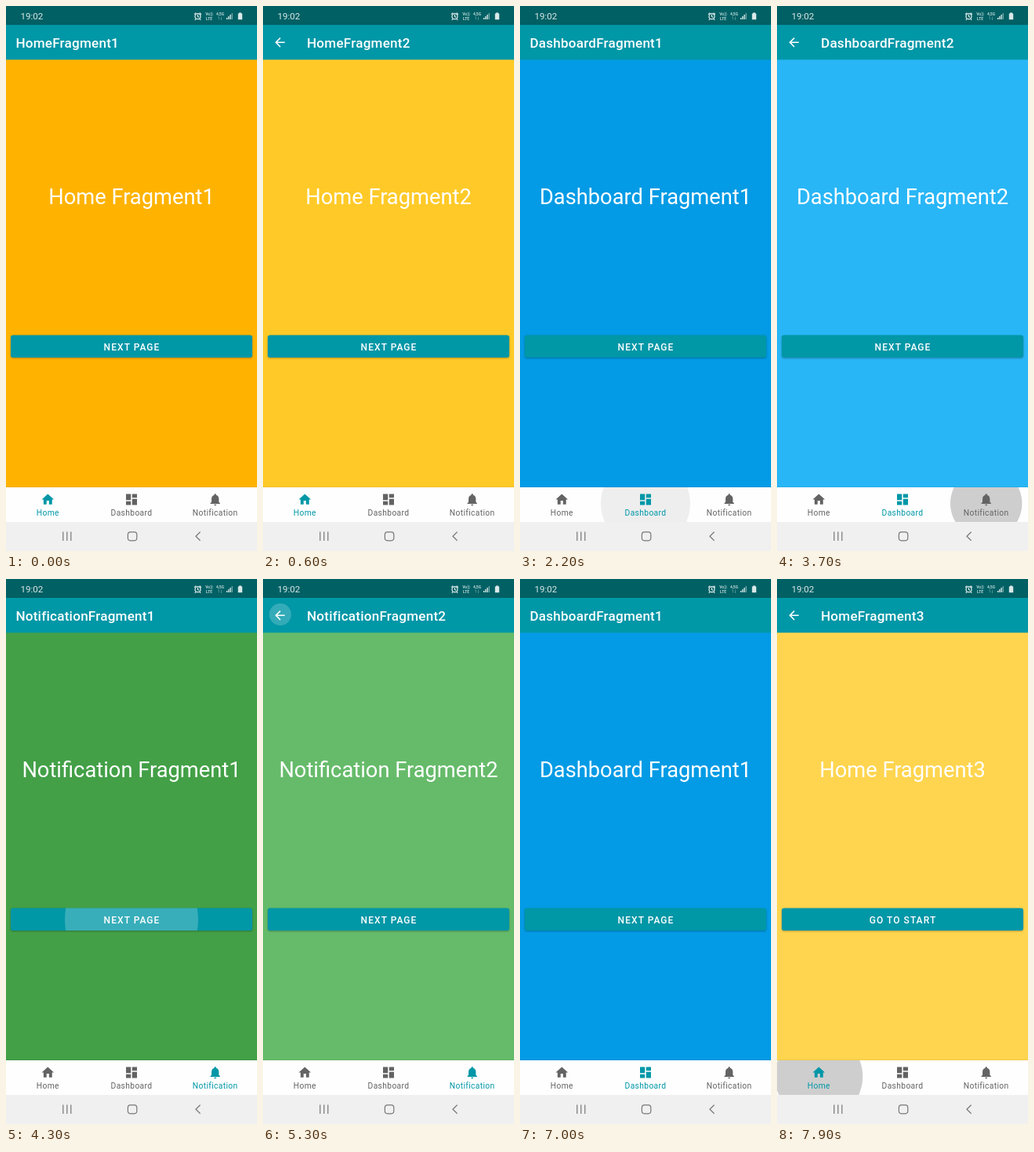
An HTML page for the animation above (8 s loop, 320 by 693 pixels).

```html
<!DOCTYPE html>
<html lang="en">
<head>
<meta charset="utf-8">
<title>Bottom navigation</title>
<style>
  html, body { margin: 0; width: 100%; height: 100%; overflow: hidden; }
  svg { display: block; width: 100vw; height: 100vh; font-family: Roboto, sans-serif; }
  .title { font-size: 17.1px; font-weight: 500; letter-spacing: .0125em; }
  .heading { font-size: 27.3px; }
  .action { font-size: 12px; font-weight: 500; letter-spacing: .089em; }
  .label { font-size: 10.3px; letter-spacing: .033em; }
  .tiny { font-size: 5px; font-weight: 500; }
  .centered { text-anchor: middle; }
  #button { filter: drop-shadow(0 1px 1px rgba(0, 0, 0, .28)); }
</style>
</head>
<body>
<svg viewBox="0 0 320 693" preserveAspectRatio="none">
  <defs>
    <clipPath id="tabClip"><rect y="612" width="320" height="44"/></clipPath>
    <clipPath id="buttonClip"><rect x="6" y="418.5" width="308" height="28.5" rx="3"/></clipPath>
  </defs>

  <rect id="background" y="68" width="320" height="545"/>
  <rect width="320" height="24.5" fill="#006064"/>
  <rect y="24" width="320" height="44.3" fill="#0097a7"/>

  <!-- Status bar -->
  <g fill="#d9e8e8">
    <text x="18.5" y="17" font-size="11.6">19:02</text>
    <g fill="none" stroke="#e4efef" stroke-width="1.2">
      <circle cx="244.5" cy="13.2" r="3.5"/>
      <path d="M244.5 11v2.4l1.6 1M240 10.6l2.3-2M249 10.6l-2.3-2M242 16.6l-1.2 1.3M247 16.6l1.2 1.3"/>
    </g>
    <text class="tiny centered" x="259" y="12">Vo))</text>
    <text class="tiny centered" x="259" y="17.6">LTE</text>
    <text class="tiny centered" x="273" y="12">4,5G</text>
    <path d="M271 17.5v-3h-1l1.5-1.5V17.5zM274.5 13.5v3h-1l1.5 1.5V13.5z" opacity=".6"/>
    <path d="M281 15h1.4v2H281zM283.2 13h1.4v4h-1.4zM285.4 11h1.4v6h-1.4z"/>
    <path d="M287.6 9h1.4v8h-1.4z" opacity=".5"/>
    <path d="M297 8.4h3v1h1.2v7.9h-5.4V9.4H297z"/>
  </g>

  <!-- App bar -->
  <circle id="backRipple" cx="22" cy="45" r="14" fill="#fff" opacity=".2"/>
  <path id="back" fill="#fff" transform="translate(12.2 37) scale(.778)"
    d="M20 11H7.83l5.59-5.59L12 4l-8 8 8 8 1.41-1.41L7.83 13H20z"/>
  <text id="title" class="title" y="53" fill="#fff"/>

  <!-- Page -->
  <text id="heading" class="heading centered" x="160" y="252.3" fill="#fff"/>
  <rect id="button" x="6" y="418.5" width="308" height="28.5" rx="3" fill="#0097a7"/>
  <circle id="buttonRipple" cx="160" cy="433" r="85" fill="#fff" opacity=".22" clip-path="url(#buttonClip)"/>
  <text id="action" class="action centered" x="160.5" y="437.6" fill="#fff"/>

  <!-- Tabs -->
  <rect y="611" width="320" height="1.2" opacity=".06"/>
  <rect y="612" width="320" height="44" fill="#fefefe"/>
  <g clip-path="url(#tabClip)"><circle id="tabRipple" cy="632.5"/></g>
  <g id="tabs"></g>

  <!-- System bar -->
  <rect y="656" width="320" height="37" fill="#f0f0f0"/>
  <g fill="none" stroke="#777" stroke-width="1.2">
    <path d="M72.8 668.5v11.5M77.8 668.5v11.5M82.8 668.5v11.5"/>
    <rect x="155.4" y="668.8" width="11.4" height="11" rx="3.2"/>
    <path d="M247.6 668.8l-5.6 5.5 5.6 5.5"/>
  </g>
</svg>
<script>
const LOOP = 8000, STEP = 100;
const $ = id => document.getElementById(id);

const sections = [
  { name: 'Home', x: 53.3, colors: ['#ffb300', '#ffca28', '#ffd54f'],
    icon: 'M10 20v-6h4v6h5v-8h3L12 3 2 12h3v8z' },
  { name: 'Dashboard', x: 160, colors: ['#039be5', '#29b6f6'],
    icon: 'M3 13h8V3H3zM3 21h8v-6H3zM13 21h8V11h-8zM13 3v6h8V3z' },
  { name: 'Notification', x: 266.7, colors: ['#43a047', '#66bb6a'],
    icon: 'M12 22c1.1 0 2-.9 2-2h-4c0 1.1.9 2 2 2zm6-6v-5c0-3.07-1.64-5.64-4.5-6.32V4c0-.83-.67-1.5-1.5-1.5s-1.5.67-1.5 1.5v.68C7.63 5.36 6 7.92 6 11v5l-2 2v1h16v-1z' }
];

// [time, section, page number]
const pages = [
  [0, 0, 1], [600, 0, 2], [1300, 0, 3], [1900, 1, 1], [2700, 1, 2], [3800, 2, 1],
  [4400, 2, 2], [5400, 2, 1], [6200, 1, 2], [7000, 1, 1], [7900, 0, 3]
];
// [touch, end, section]
const tabTaps = [[1710, 2300, 1], [3600, 4100, 2], [6083, 6600, 1], [7744, 8300, 0]];
const buttonTaps = [500, 1200, 2600, 4300];
const backTaps = [5300, 6900];

$('tabs').innerHTML = sections.map(({ name, x, icon }) => `<g>
  <path d="${icon}" transform="translate(${x - 9.33} 618.2) scale(.778)"/>
  <text class="label centered" x="${x}" y="648">${name}</text></g>`).join('');

const show = (id, visible) => $(id).setAttribute('visibility', visible ? 'visible' : 'hidden');

function drawPage(t) {
  const [, index, number] = pages.findLast(([start]) => start <= t);
  const { name, colors } = sections[index];
  $('background').setAttribute('fill', colors[number - 1]);
  $('title').textContent = `${name}Fragment${number}`;
  $('title').setAttribute('x', number > 1 ? 56 : 12.4);
  $('heading').textContent = `${name} Fragment${number}`;
  $('action').textContent = number === 3 ? 'GO TO START' : 'NEXT PAGE';
  show('back', number > 1);
  [...$('tabs').children].forEach((tab, i) =>
    tab.setAttribute('fill', i === index ? '#0097a7' : '#636363'));
}

function drawTabRipple(t) {
  const tap = tabTaps.find(([touch, end]) => t > touch && t < end);
  show('tabRipple', tap);
  if (!tap) return;
  const [touch, end, index] = tap;
  const growth = Math.min(1, (t - touch) / 180);
  const ripple = $('tabRipple');
  ripple.setAttribute('cx', sections[index].x);
  ripple.setAttribute('r', 57 * (1 - (1 - growth) ** 2));
  ripple.setAttribute('opacity', .19 * Math.min(1, (end - t) / 300));
}

function draw(now) {
  const t = Math.floor(now % LOOP / STEP) * STEP;
  drawPage(t);
  drawTabRipple(t);
  show('buttonRipple', buttonTaps.includes(t));
  show('backRipple', backTaps.includes(t));
}

const begin = performance.now();
function tick() {
  draw(performance.now() - begin);
  requestAnimationFrame(tick);
}
tick();
</script>
</body>
</html>
```
